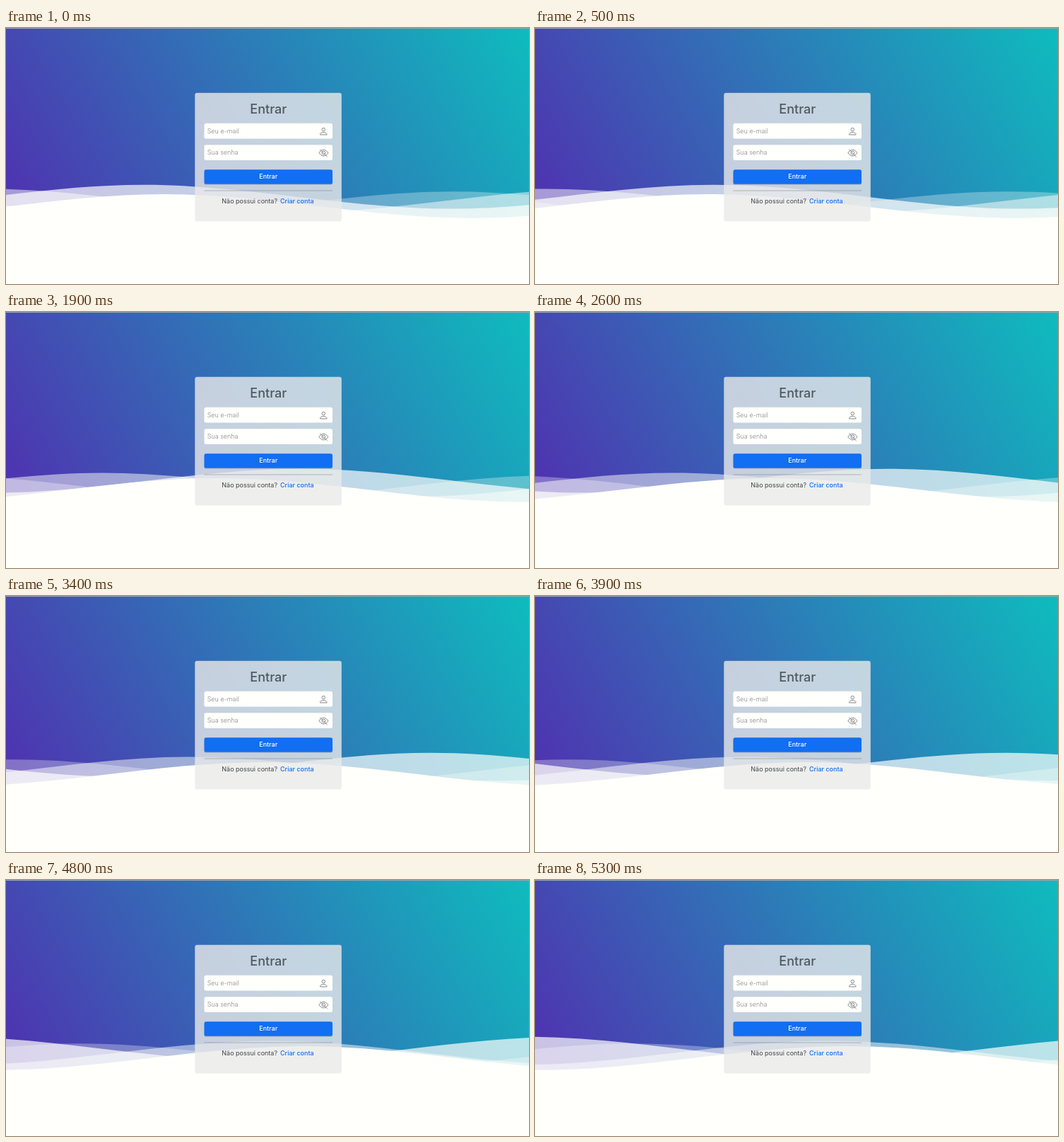
An HTML page that plays this animation: 740 px wide and 362 px high, repeating every 5.4 s.

```html
<!DOCTYPE html>
<html lang="pt-BR">
<head>
<meta charset="utf-8">
<title>Entrar</title>
<style>
  html, body { margin: 0; width: 100%; height: 100%; overflow: hidden; background: #fffffc; }
  svg { display: block; }
  text { font: 400 9px Inter, "Open Sans", sans-serif; }
  .mid { text-anchor: middle; }
  .hint { fill: #85888b; font-weight: 300; }
  .icon { fill: none; stroke: #808386; stroke-width: 1.1; }
</style>
</head>
<body>
<svg width="740" height="362" viewBox="0 0 740 362">
  <defs>
    <!-- 60deg gradient across a 740 x 271 box -->
    <linearGradient id="sky" gradientUnits="userSpaceOnUse" x1="33.8" y1="329.6" x2="706.2" y2="-58.6">
      <stop offset="0" stop-color="#5030b0"/>
      <stop offset="1" stop-color="#0ebcbe"/>
    </linearGradient>
    <path id="wave" d="M-160 44c30 0 58-18 88-18s58 18 88 18 58-18 88-18 58 18 88 18v44h-352z"/>
  </defs>

  <rect width="740" height="362" fill="#fffffc"/>
  <rect width="740" height="271" fill="url(#sky)"/>
  <rect width="740" height="1" fill="#9aa3ad"/>

  <g id="waves" fill="#fffffc" transform="translate(0 172.9) scale(4.9333 1.88)"></g>

  <rect x="267.3" y="91.8" width="207.5" height="181.7" rx="3" fill="#eaeaea" fill-opacity=".8"/>
  <text class="mid" x="371.3" y="121" fill="#4d5962" style="font-size:18px;font-weight:500">Entrar</text>

  <g fill="#fffffc">
    <rect x="280.5" y="134.8" width="181.5" height="21.7" rx="2.6"/>
    <rect x="280.5" y="165.2" width="181.5" height="21.7" rx="2.6"/>
  </g>
  <text class="hint" x="284.7" y="148.7">Seu e-mail</text>
  <text class="hint" x="284.7" y="179.2">Sua senha</text>

  <g class="icon" transform="translate(442.3 139.2) scale(.87)">
    <circle cx="8" cy="5" r="2.6"/>
    <path d="M2.5 13.5c0-2.6 2-4 5.500-4s5.500 1.400 5.500 4z" stroke-linejoin="round"/>
  </g>
  <g class="icon" transform="translate(442.400 169.600) scale(.87)">
    <path d="M.6 8C2 5.500 5 3 8 3s6 2.500 7.400 5C14 10.500 11 13 8 13S2 10.500.6 8z"/>
    <circle cx="8" cy="8" r="2.800"/>
    <path d="M2 2.400l12 12"/>
  </g>

  <rect x="280.5" y="201.3" width="181.5" height="20.7" rx="2.6" fill="#000" fill-opacity=".1"/>
  <rect x="280.5" y="200.2" width="181.5" height="20.6" rx="2.6" fill="#126ef2"/>
  <text class="mid" x="371.2" y="213.3" fill="#fffffc" style="font-weight:500">Entrar</text>

  <rect x="280.5" y="229.6" width="181.5" height=".8" fill="#50555a" fill-opacity=".45"/>
  <text x="305.300" y="248.200" fill="#40444a">Não possui conta?</text>
  <text x="388" y="248.200" fill="#126ef2" style="font-weight:500">Criar conta</text>
</svg>

<script>
const LOOP = 5400, STEP = 100, START = 53.07;

const waves = [
  { y: 0, alpha: 0.7, delay: 2, period: 7 },
  { y: 3, alpha: 0.5, delay: 3, period: 10 },
  { y: 5, alpha: 0.3, delay: 4, period: 13 },
  { y: 7, alpha: 1, delay: 5, period: 20 }
];

const group = document.getElementById('waves');
for (const w of waves) {
  w.node = document.createElementNS('http://www.w3.org/2000/svg', 'use');
  w.node.setAttribute('href', '#wave');
  w.node.setAttribute('fill-opacity', w.alpha);
  group.appendChild(w.node);
}

const bezier = (a, b, s) => 3 * (1 - s) ** 2 * s * a + 3 * (1 - s) * s * s * b + s ** 3;

// cubic-bezier(.55, .5, .45, .5)
function ease(p) {
  let lo = 0, hi = 1;
  for (let i = 0; i < 24; i++) {
    const mid = (lo + hi) / 2;
    if (bezier(0.55, 0.45, mid) < p) lo = mid; else hi = mid;
  }
  return bezier(0.5, 0.5, lo);
}

function draw(ms) {
  const sec = START + Math.floor(ms / STEP) * STEP / 1000;
  for (const w of waves) {
    const p = (sec + w.delay) / w.period % 1;
    const x = 48 - 90 + 175 * ease(p);
    w.node.setAttribute('transform', `translate(${x.toFixed(3)} ${w.y})`);
  }
}

function tick() {
  draw(performance.now() % LOOP);
  requestAnimationFrame(tick);
}
tick();
</script>
</body>
</html>
```
